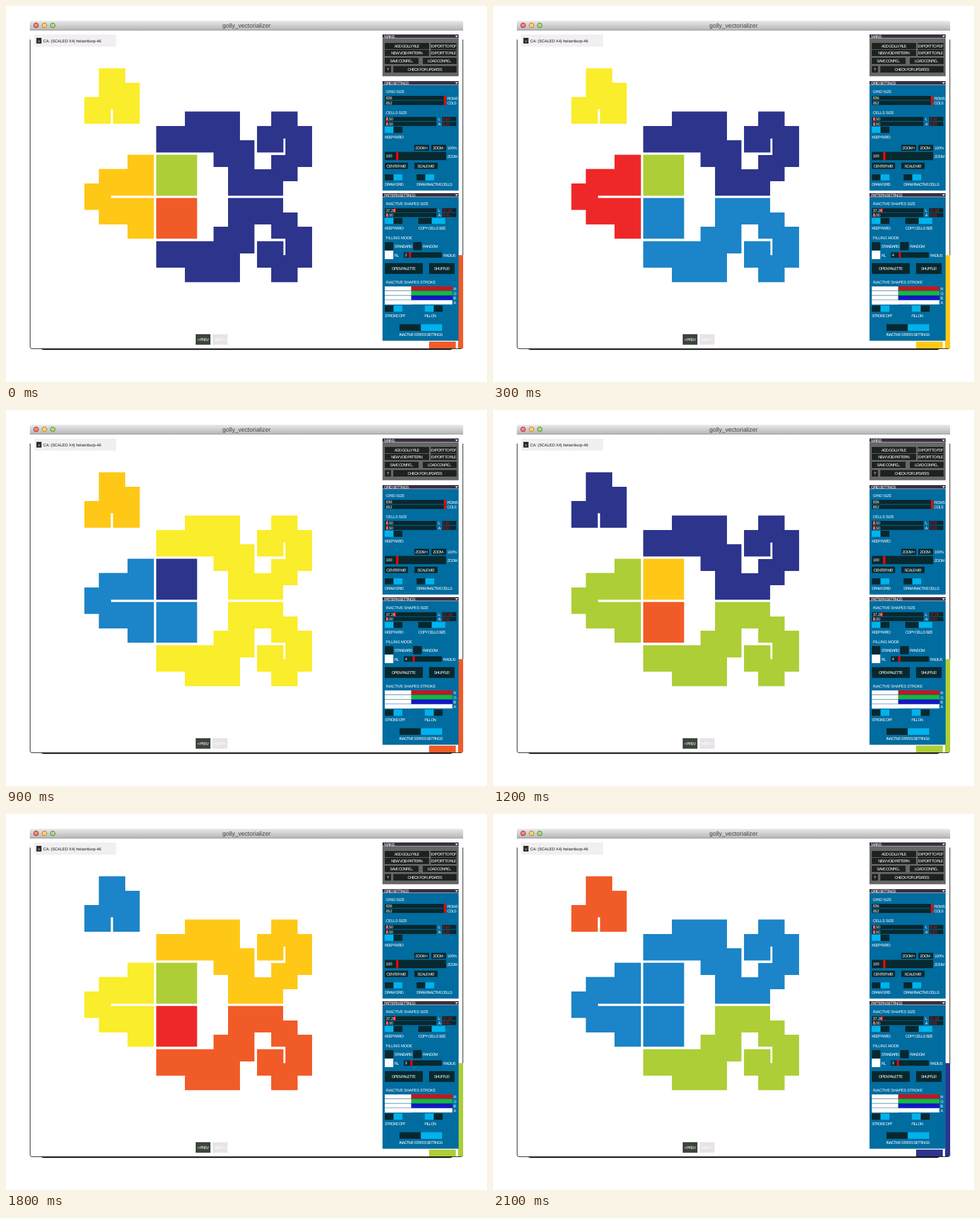
Animation of 847x661 px, one loop 2400 ms. Source, as an HTML page:

```html
<!DOCTYPE html>
<html lang="en">
<head>
<meta charset="utf-8">
<title>golly_vectorializer</title>
<style>
  html, body { margin: 0; width: 100%; height: 100%; overflow: hidden; background: #fff; }
  svg { display: block; width: 847px; height: 661px; }
  text { font: 7px "Liberation Sans", Arial, sans-serif; fill: #fff; letter-spacing: -.9px; text-rendering: geometricPrecision; white-space: pre; }
  text.wide { letter-spacing: -.27px; }
</style>
</head>
<body>
<svg id="stage" viewBox="0 0 847 661" xmlns="http://www.w3.org/2000/svg">
  <defs>
    <linearGradient id="bar" x2="0" y2="1">
      <stop offset="0" stop-color="#e9e9e9"/>
      <stop offset="1" stop-color="#b4b4b4"/>
    </linearGradient>
    <linearGradient id="gloss" x2="0" y2="1">
      <stop offset="0" stop-color="#fff" stop-opacity=".1"/>
      <stop offset=".3" stop-color="#fff" stop-opacity=".45"/>
      <stop offset="1" stop-color="#fff" stop-opacity=".2"/>
    </linearGradient>
  </defs>
</svg>
<script>
const stage = document.getElementById("stage");
const DARK = "#08282f", BUTTON = "#1d221f", CYAN = "#00b3ec", RED = "#f00", WHITE = "#fff";

function add(tag, attrs, content) {
  const el = document.createElementNS("http://www.w3.org/2000/svg", tag);
  for (const key in attrs) el.setAttribute(key, attrs[key]);
  if (content !== undefined) el.textContent = content;
  return stage.appendChild(el);
}

// Boxes are given by their edges, text by its left edge and vertical middle.
const box = (x1, y1, x2, y2, fill) => add("rect", { x: x1, y: y1, width: x2 - x1, height: y2 - y1, fill });
const path = (d, attrs) => add("path", { d, ...attrs });
const label = (x, y, str, attrs) => add("text", { x, y: y + 2.6, ...attrs }, str);
const wide = (x, y, str, attrs) => label(x, y, str, { class: "wide", ...attrs });

function button(x1, y1, x2, y2, str, fill = BUTTON) {
  box(x1, y1, x2, y2, fill);
  label((x1 + x2) / 2 - .4, (y1 + y2) / 2, str, { "text-anchor": "middle" });
}

function toggle(x1, y1, x2, y2, leftOn) {
  const mid = (x1 + x2) / 2;
  box(x1, y1, mid, y2, leftOn ? CYAN : DARK);
  box(mid, y1, x2, y2, leftOn ? DARK : CYAN);
}

function slider(x1, y1, x2, y2, knob, width, str) {
  box(x1, y1, x2, y2, DARK);
  const mark = box(knob, y1, knob + width, y2, RED);
  return { mark, value: wide(x1 + 2, (y1 + y2) / 2, str) };
}

function sizeRow(y, knob, width, str, name) {
  slider(667, y, 758, y + 7.4, knob, width, str);
  label(761, y + 3.7, name);
  box(768, y, 793, y + 7.4, DARK);
  wide(769, y + 3.7, str, { style: "fill:#e00d12" });
}

function panel(y, bottom, fill, title) {
  box(663, y + 7, 797, bottom, fill);
  box(663, y, 797, y + 6.4, "#393040");
  label(666, y + 3.2, title);
  path(`M791 ${y + 2}h5l-2.5 3z`, { fill: WHITE });
}

function drawWindow() {
  path("M42 43V29.500Q42 26 46 26H801Q805 26 805 29.500V43Z", { fill: "url(#bar)" });
  box(42, 42, 805, 43, "#969696");
  [[53, "#e8443c", "#a3231f"], [67.7, "#f2b632", "#a5731a"], [82.3, "#7fc04a", "#4a8128"]].forEach(([cx, fill, stroke]) => {
    add("circle", { cx, cy: 34, r: 4.1, fill, stroke, "stroke-width": .9 });
    add("circle", { cx, cy: 34, r: 3.4, fill: "url(#gloss)" });
  });
  add("text", { x: 423.500, y: 38, "text-anchor": "middle",
    style: "font-size:10.7px;letter-spacing:0;fill:#444" }, "golly_vectorializer");
  path("M42.500 59V599Q42.500 602.500 46 602.500H801Q804.500 602.500 804.500 599V59", { fill: "none", stroke: "#111" });
  path("M60 602.500H787L783 604.500H66Z", { fill: "#111" });

  box(50, 50, 194, 71.500, "#f2eff2");
  box(53.500, 56, 62.500, 66, "#2b2b2b");
  label(58, 61, "X", { "text-anchor": "middle", style: "font-size:5.5px;letter-spacing:0" });
  wide(65.500, 61.300, "CA: (SCALED X4) heisenburp-46", { style: "fill:#111;letter-spacing:-.05px" });
  button(334, 577, 360, 595.500, "< PREV", "#3c443c");
  button(364, 577, 390, 595.500, "NEXT >", "#e8e3e8");
}

function drawMains() {
  panel(50, 123.500, "#666", "MAINS");
  button(667, 65, 745, 76, "ADD GOLLY RLE");
  button(748, 65, 793.500, 76, "EXPORT TO PDF");
  button(667, 77, 745, 88, "NEW VOID PATTERN");
  button(748, 77, 793.500, 88, "EXPORT TO RLE");
  button(667, 91, 726.500, 102, "SAVE CONFIG...");
  button(734, 91, 793.500, 102, "LOAD CONFIG...");
  button(667, 105.500, 678, 117, "?");
  button(682, 105.500, 793.500, 117, "CHECK FOR UPDATES");
}

function drawGridSettings() {
  panel(132, 324.500, "#006c9f", "GRID SETTINGS");
  wide(669, 150, "GRID SIZE");
  slider(667, 158, 775, 165.400, 771, 4, "836");
  slider(667, 166.400, 775, 174, 771, 4, "852");
  label(777, 162, "ROWS");
  label(777, 170.300, "COLS");

  wide(669, 187.500, "CELLS SIZE");
  sizeRow(195, 670, 2.500, "8.50", "L");
  sizeRow(203.500, 670, 2.500, "8.50", "A");
  toggle(667, 212, 698, 223, true);
  label(667, 230, "KEEP RATIO");

  button(719, 244, 745, 254.500, "ZOOM +", DARK);
  button(749, 244, 775, 254.500, "ZOOM -", DARK);
  wide(777, 249.200, "100%");
  slider(667, 256.500, 775, 271, 687, 4, "100");
  label(777, 264, "ZOOM");
  button(667, 275.500, 708, 286.500, "CENTER ME!", DARK);
  button(719, 275.500, 760, 286.500, "SCALE ME!", DARK);
  toggle(667, 296, 698, 306.500, false);
  toggle(723, 296, 754, 306.500, false);
  label(667, 313.300, "DRAW GRID");
  label(723, 313.300, "DRAW INACTIVE CELLS");
}

function drawPatternSettings() {
  panel(329, 588.500, "#006c9f", "PATTERN SETTINGS");
  wide(669, 347.500, "INACTIVE SHAPES SIZE");
  sizeRow(355.500, 683, 3.500, "37.28", "L");
  sizeRow(363.700, 670, 2.500, "8.00", "A");
  toggle(667, 372.500, 698, 383, true);
  toggle(726, 372.500, 773.500, 383, false);
  label(667, 390, "KEEP RATIO");
  label(726, 390, "COPY CELLS SIZE");

  wide(669, 407, "FILLING MODE");
  box(667, 415, 682, 429.500, DARK);
  label(684, 422.300, "STANDARD");
  box(717, 415, 732, 429.500, DARK);
  label(734, 422.300, "RANDOM");
  box(667, 430, 682, 445, WHITE);
  label(684, 438, "RL");
  const radius = slider(700.500, 433, 767.500, 442.500, 709.500, 3.700, "2");
  label(770, 438, "RADIUS");
  button(667, 452, 734, 471, "OPEN PALETTE", DARK);
  button(745, 452, 790, 471, "SHUFFLE!", DARK);

  wide(669, 485, "INACTIVE SHAPES STROKE");
  [["R", "#c5161d"], ["G", "#13bb3a"], ["B", "#1a14c4"], ["A", WHITE]].forEach(([name, fill], i) => {
    const y = 493 + i * 8.1;
    box(667, y, 786, y + 7.3, fill);
    box(667, y, 713.500, y + 7.3, WHITE);
    label(788, y + 4, name);
  });
  toggle(667, 526.500, 698, 537.500, false);
  toggle(737.500, 526.500, 769, 537.500, true);
  label(667, 544, "STROKE OFF");
  label(737, 544, "FILL ON");
  toggle(693, 559.500, 768, 571, false);
  label(692.500, 577.300, "INACTIVE STATES SETTINGS");
  return radius;
}

const WING = "M315 185.500H412V236H437.500V287H467V262H492V233H488.500V257.500H442V211H467V185.500"
  + "H513.500V211H539V283H513.500V308H488V333.500H391V283H365.500V257.500H264.500V211H315Z";

drawWindow();
const shapes = [
  path("M163.500 109.500H210V135H235.500V207H188.500V181.500H184.500V207H138V160H163.500Z"),
  path("M214 261.500H260.500V333.500H185V337.500H260.500V409H214V384H163.500V358.500H138V312H163.500V286.500H214Z"),
  path("M264.500 261.500H336.500V333.500H264.500Z"),
  path("M264.500 337.500H336.500V409H264.500Z"),
  path(WING),
  path(WING, { transform: "matrix(1 0 0 -1 0 671)" }),
  path("M797 438H805V599Q805 602 802 602H796V589H797ZM745 590H792V602H745Z")
];
drawMains();
drawGridSettings();
const radius = drawPatternSettings();

const PALETTE = {
  n: "#2c348c", y: "#faed2b", a: "#ffc817", g: "#adce36", o: "#f15b28", r: "#ee2828", b: "#1c84c8"
};

// One colour letter per shape, then the radius and its knob position.
const STEPS = [
  ["yagonno", 2, 709.5],
  ["yrgbnba", 4, 714.5],
  ["gorabna", 5, 720],
  ["abnbyyo", 4, 716],
  ["ngaongg", 4, 713.7],
  ["yrnarrr", 2, 708.5],
  ["bygraog", 3, 712],
  ["obbbbgn", 3, 711]
];
const STEP_MS = 300;
let shown = -1;

function render(now) {
  const index = Math.floor(now / STEP_MS) % STEPS.length;
  if (index !== shown) {
    const [colors, value, knob] = STEPS[index];
    shapes.forEach((shape, i) => shape.setAttribute("fill", PALETTE[colors[i]]));
    radius.value.textContent = value;
    radius.mark.setAttribute("x", knob);
    shown = index;
  }
}

const start = performance.now();
function tick() {
  render(performance.now() - start);
  requestAnimationFrame(tick);
}
tick();
</script>
</body>
</html>
```
